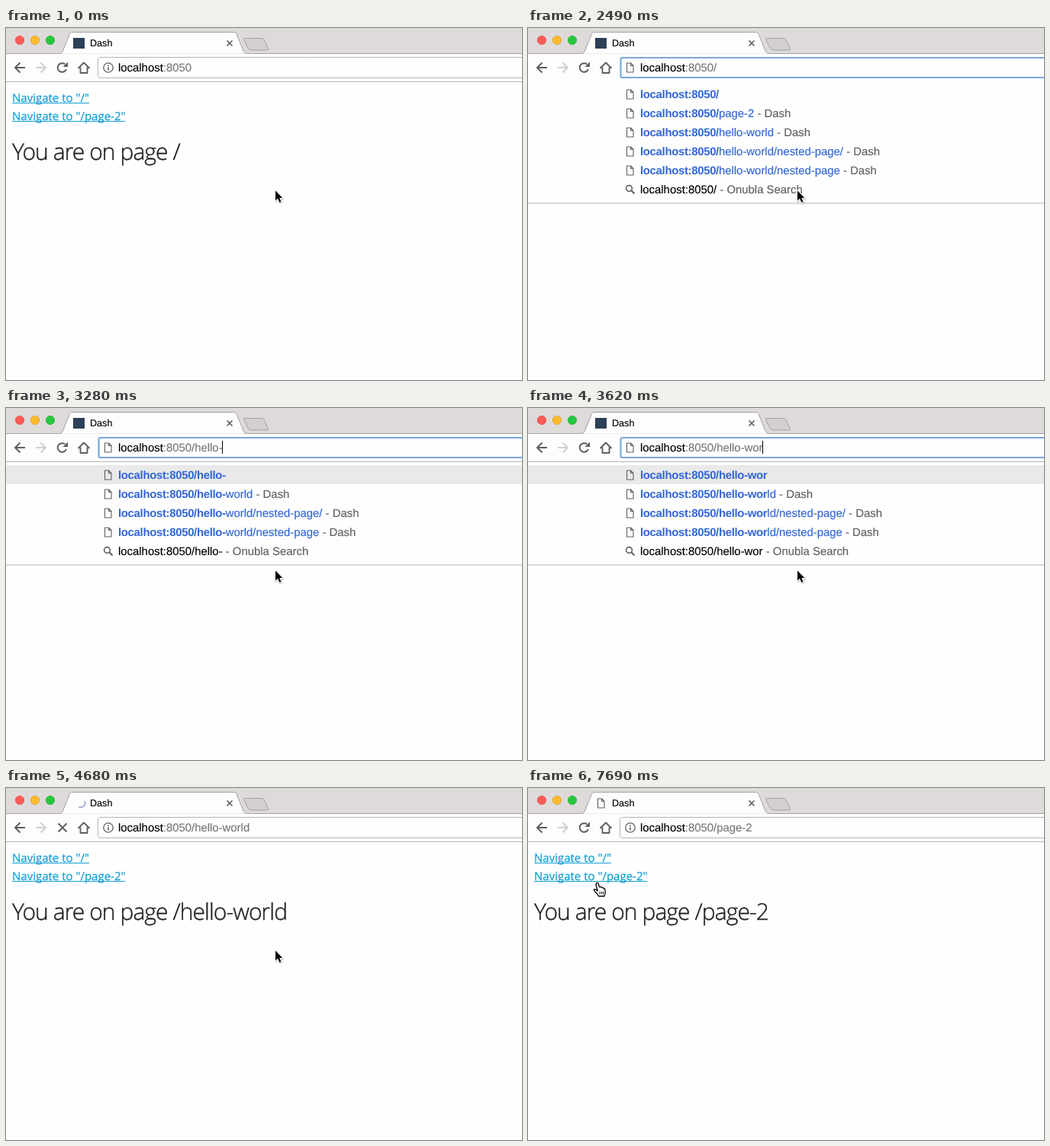
Recreate the animation shown at these times as an HTML page with a canvas. Size 676 px wide and 462 px high, loop 8000 ms.

```html
<!DOCTYPE html>
<html lang="en">
<head>
<meta charset="utf-8">
<title>Dash</title>
<style>
  html, body { margin: 0; width: 100%; height: 100%; overflow: hidden; background: #fefefe; }
  canvas { display: block; }
</style>
</head>
<body>
<canvas id="stage" width="676" height="462"></canvas>
<script>
const ctx = document.getElementById('stage').getContext('2d');
ctx.textRendering = 'geometricPrecision';
const LOOP = 8000;
const UI = '14.9px "Liberation Sans", Arial, sans-serif';
const ICON = '#5f5f5f', BLUE = '#3367d6', GREY = '#606060';
const HOST = 'localhost', PORT = ':8050', ORIGIN = HOST + PORT;
const PAGES = ['/page-2', '/hello-world', '/hello-world/nested-page/', '/hello-world/nested-page'];
const WORD = '/hello-world';
const KEY_TIMES = [1870, 2670, 2760, 2840, 2930, 3100, 3280, 3370, 3540, 3620, 3710, 3800];
const ENTER = 3890, PAINTED = 4410, LOADED = 4770, CLICK = 7690;

const between = (t, a, b) => t >= a && t < b;

function rect(x, y, w, h, fill) {
  ctx.fillStyle = fill;
  ctx.fillRect(x, y, w, h);
}

function shape(d, { fill, stroke, width = 1, x = 0, y = 0 }) {
  const path = new Path2D(d);
  ctx.save();
  ctx.translate(x, y);
  ctx.lineWidth = width;
  ctx.lineJoin = 'round';
  if (fill) { ctx.fillStyle = fill; ctx.fill(path); }
  if (stroke) { ctx.strokeStyle = stroke; ctx.stroke(path); }
  ctx.restore();
}

function arc(x, y, r, from, to, stroke, width, fill) {
  ctx.beginPath();
  ctx.arc(x, y, r, from, to);
  if (fill) { ctx.fillStyle = fill; ctx.fill(); }
  ctx.strokeStyle = stroke;
  ctx.lineWidth = width;
  ctx.stroke();
}

// Draws a run of text, slightly thickened like macOS font smoothing, and returns its end x.
function text(str, x, y, color, font = UI, spacing = 0, smoothing = 0.15) {
  ctx.font = font;
  ctx.letterSpacing = spacing + 'px';
  ctx.fillStyle = ctx.strokeStyle = color;
  ctx.lineWidth = smoothing;
  ctx.fillText(str, x, y);
  ctx.strokeText(str, x, y);
  return x + ctx.measureText(str).width;
}

function documentIcon(x, y) {
  shape('M.5 .5H5.5L9 4V12.5H.5ZM5.5 .5V4H9', { x, y, stroke: ICON, width: 1.1 });
}

function drawTab(t) {
  rect(0, 0, 676, 34, '#dedada');
  [['#fc5b57', '#e2463f'], ['#fdbb2e', '#dfa023'], ['#27c840', '#1dad2b']].forEach(([fill, edge], i) =>
    arc(18 + 20 * i, 16, 5.6, 0, 7, edge, 0.8, fill));
  rect(0, 34, 676, 37, '#fdfdfd');
  const outline = 'M70 33.5C73 33.5 73.5 32 74.5 30L83 9C84 6.5 85 5.5 87 5.5H298C300.5 5.5 301.5 6.5 302.5 9L311 30C312 32 313 33.5 316 33.5';
  shape(outline, { fill: '#fdfdfd' });
  shape(outline + 'H676M0 33.5H70', { stroke: '#a3a0a0' });
  shape('M313 13.5H334.5Q337 13.5 338 15.5L343.5 27Q344.3 29 342 29H321Q318.5 29 317.5 27L311.6 15.5Q311 13.5 313 13.5Z',
    { fill: '#d3cfcf', stroke: '#a3a0a0' });

  if (t < ENTER) rect(88, 13, 15, 14, '#2c4057');
  else if (t < LOADED) {
    const turn = -(t - ENTER) / 1000 * 2 * Math.PI;
    arc(98, 19.5, 5.7, turn - 1.75, turn + 0.75, '#a9aed4', 2);
  } else documentIcon(91, 13.5);
  text('Dash', 110, 24, '#000', '12.6px "Liberation Sans", Arial, sans-serif');
  shape('M289.5 16.5L296.5 23.5M296.5 16.5L289.5 23.5', { stroke: ICON, width: 1.7 });
}

function drawToolbar(t) {
  rect(0, 70, 676, 1, '#b5b3b3');
  shape('M25 52H12.5M18.5 45.5L12 52L18.5 58.5', { stroke: ICON, width: 2 });
  shape('M39 52H51.5M45.5 45.5L52 52L45.5 58.5', { stroke: '#d0d0d0', width: 2 });
  if (between(t, ENTER, LOADED)) {
    shape('M68.5 46.5L79.5 57.5M79.5 46.5L68.5 57.5', { stroke: ICON, width: 2 });
  } else {
    arc(73.5, 52, 5.8, 0.35, 5.4, ICON, 2);
    shape('M81 44.5V51H74.5Z', { fill: ICON });
  }
  shape('M94.5 53L102 45.5L109.5 53M97.5 51.5V59H106.5V51.5', { stroke: ICON, width: 1.9 });
}

function caretVisible(t) {
  return between(t, 1250, 1790) || between(t, 1870, 2490) || between(t, 2670, ENTER);
}

function drawAddress(t, typed) {
  const focused = between(t, 900, ENTER);
  ctx.beginPath();
  if (focused) ctx.roundRect(121.5, 39, 570, 26, 2);
  else ctx.roundRect(120.5, 38.5, 570, 27, 3);
  ctx.fillStyle = '#fefefe';
  ctx.fill();
  ctx.strokeStyle = focused ? '#7aa7dc' : '#b6b6b6';
  ctx.lineWidth = focused ? 2.2 : 1;
  ctx.stroke();

  if (between(t, 1870, ENTER)) documentIcon(129, 45.5);
  else {
    arc(134, 52, 6.2, 0, 7, ICON, 1.3);
    rect(133.2, 48.5, 1.6, 1.6, ICON);
    rect(133.2, 51.2, 1.6, 4.3, ICON);
  }
  if (between(t, 900, 1250)) rect(147, 43, 96, 17, '#b3d7fe');
  const hostEnd = text(HOST, 147, 57, '#000');
  const end = text(PORT + (t < CLICK ? typed : '/page-2'), hostEnd, 57, '#787878');
  if (caretVisible(t)) rect(Math.floor(end), 43, 1, 17, '#000');
}

function drawSuggestions(t, typed) {
  const late = t >= 3280;
  const top = late ? 75 : 74;
  const matches = PAGES.filter(p => p.startsWith(typed) && p !== typed);
  const bottom = top + 25 * (matches.length + 2) + 5;
  const baseline = row => top + 18 + 25 * row;
  const clear = late ? 71 : 67;
  rect(0, clear, 676, bottom - clear, '#fefefe');
  ['#d2d2d2', '#e4e4e4', '#f4f4f4'].forEach((shade, i) => rect(0, bottom + i, 676, 1, shade));
  if (typed.length > 1) rect(0, top, 676, 25, '#e9e9e9');

  [typed, ...matches].forEach((page, row) => {
    const y = baseline(row);
    documentIcon(129, y - 11.5);
    let x = text(ORIGIN + typed, 147, y, BLUE, 'bold ' + UI, -0.31, 0.01);
    if (row) {
      x = text(page.slice(typed.length), x, y, BLUE);
      text(' - Dash', x, y, GREY);
    }
  });
  const y = baseline(matches.length + 1);
  arc(132.5, y - 6.5, 3.9, 0, 7, ICON, 1.6);
  shape('M135.5 0L139.5 4', { y: y - 3.5, stroke: ICON, width: 2 });
  text(' - Onubla Search', text(ORIGIN + typed, 147, y, '#000'), y, GREY);
}

function drawLink(label, y, hovered) {
  const color = hovered ? '#0fa0ce' : '#139fd7';
  const end = text(label, 8, y, color, '15px "Open Sans", sans-serif', 0, 0.25);
  rect(8, y + 1, end - 8, 1, color);
}

function drawPage(t, pointer) {
  rect(0, 71, 676, 391, '#fefefe');
  const over = y => pointer && pointer.x < 157 && between(pointer.y, y - 18, y + 6);
  drawLink('Navigate to "/"', 97, over(97));
  drawLink('Navigate to "/page-2"', 121, over(121));
  const path = t < PAINTED ? '/' : t < CLICK ? WORD : '/page-2';
  text('You are on page ' + path, 8, 173, '#222', '300 30px "Open Sans", sans-serif', -0.93, 0.4);
}

function pointerAt(t) {
  if (t < 6200) return { x: 352, y: 212 };
  if (t < 6290) return { x: 324, y: 202 };
  if (t < 6560) return null;
  const p = Math.min(1, (t - 6560) / 770);
  const left = (1 - p) ** 2;
  return { x: 91 + 47 * left, y: 125 - 24 * left };
}

function drawPointer({ x, y }) {
  if (x > 157) {
    const arrow = 'M1 1.5V14.5L4 11.7L6.3 17L8.5 16L6.3 11H10.2Z';
    shape(arrow, { x: x + 0.6, y: y + 1, stroke: 'rgba(0,0,0,.18)', width: 3 });
    shape(arrow, { x, y, stroke: '#fff', width: 2 });
    shape(arrow, { x, y, fill: '#000' });
  } else {
    const hand = 'M-1.5 0Q0-1.5 1.2 .5L2.6 5Q4.5 4 5.3 5.6Q7.2 5 7.8 6.8Q9.5 6.5 9.9 8.5L10.3 11.5Q10 14 9 17H1.5Q-.5 13.5-3.5 10.5Q-5.5 8.3-3.7 7.8Q-2 7.8 .2 10L-1.9 2Z';
    shape(hand, { x, y, fill: '#fff', stroke: '#000', width: 1.3 });
    shape('M3 11V14.5M5.3 11V14.5M7.5 11V14.5', { x, y, stroke: '#111' });
  }
}

function draw(now) {
  const t = now % LOOP;
  const typed = WORD.slice(0, KEY_TIMES.filter(k => t >= k).length);
  const pointer = pointerAt(t);
  drawPage(t, pointer);
  drawTab(t);
  drawToolbar(t);
  drawAddress(t, typed);
  if (between(t, 1960, ENTER)) drawSuggestions(t, typed);
  if (pointer) drawPointer(pointer);
  requestAnimationFrame(draw);
}
requestAnimationFrame(draw);
</script>
</body>
</html>
```
